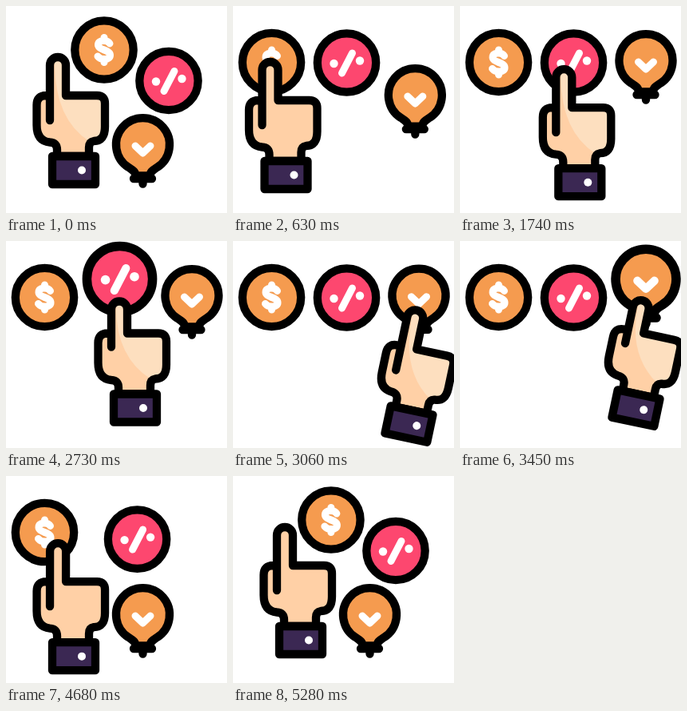
These frames come from a looping animation (277 by 259 pixels, 5.4 s). An HTML page:

```html
<!DOCTYPE html>
<html lang="en">
<head>
<meta charset="utf-8">
<title>Tapping hand</title>
<style>
  html, body { margin: 0; width: 100%; height: 100%; overflow: hidden; background: #fff; }
  svg { display: block; width: 100%; height: 100%; }
  .ink { stroke: #000; stroke-width: 10.3; stroke-linecap: round; stroke-linejoin: round; }
  .mark { fill: none; stroke: #fff; stroke-width: 9; stroke-linecap: round; stroke-linejoin: round; }
</style>
</head>
<body>
<svg viewBox="0 0 277 259">
  <g id="coin">
    <circle class="ink" r="36.7" fill="#f59b4f"/>
    <path class="mark" d="M7-8C4-13-8-13-7.5-6C-7 0 7 0 7.5 6C8 13-4 13-8 8M0-15.5V-12M0 12V15.5"/>
  </g>
  <g id="percent">
    <circle class="ink" r="36.7" fill="#fd476f"/>
    <path class="mark" d="M7-12L-6 13"/>
    <circle cx="-16" cy="1" r="5.2" fill="#fff"/>
    <circle cx="16.5" cy="-2.5" r="5.2" fill="#fff"/>
  </g>
  <g id="balloon">
    <path class="ink" fill="none" d="M-11.5 42.5H11.500M0 43V49"/>
    <path class="ink" fill="#f59b4f" d="M-9 39C-9 33-14 31-18 28.300A33.500 33.500 0 1 1 18 28.300C14 31 9 33 9 39Z"/>
    <path class="mark" d="M-9.500 1.500L0 10.500L9.500 1.500"/>
  </g>
  <g id="hand">
    <path id="skin" fill="#ffd0a6"/>
    <path id="shine" fill="#fddfbf"/>
    <path id="edge" class="ink" fill="none"/>
    <rect class="ink" x="58" y="188" width="54" height="35" fill="#3b2853"/>
    <circle cx="95" cy="205.500" r="5" fill="#fff"/>
  </g>
</svg>
<script>
const LOOP = 5400;
const el = id => document.getElementById(id);
const coin = el('coin'), percent = el('percent'), balloon = el('balloon');
const hand = el('hand'), skin = el('skin'), shine = el('shine'), edge = el('edge');

const mix = (a, b, u) => a + (b - a) * u;
const curve = (a, b, c, u) => mix(mix(a, b, u), mix(b, c, u), u);

// Smooth step from 0 at time a to 1 at time b.
function ease(t, a, b) {
  const u = Math.min(1, Math.max(0, (t - a) / (b - a)));
  return u * u * (3 - 2 * u);
}

// Rises during a..b, falls during c..d.
const hold = (t, a, b, c, d) => ease(t, a, b) - ease(t, c, d);
const bump = (t, a, peak, b) => hold(t, a, peak, peak, b);

function place(node, x, y, scale) {
  node.setAttribute('transform', `translate(${x} ${y}) scale(${scale})`);
}

// The finger gets shorter as it presses.
function drawHand(press) {
  const tip = 74 + 8 * press;
  const d = `M55 ${143 - 14 * press}V${tip}a10 10 0 0 1 20 0V112H114q10 0 10 10V151`
    + 'q0 18-14 18q-6 1-6 8V188H64V180q0-9-9-9.500Q38.500 169 38.500 149V124q0-12 12-12H55';
  skin.setAttribute('d', d);
  edge.setAttribute('d', d);
  shine.setAttribute('d', `M61 ${tip}a7 10 0 0 1 14 0V112H114q10 0 10 10V151`
    + `q0 18-14 18H104Q62 142 61 ${tip}Z`);
}

function draw(t) {
  // Cluster to row and back.
  const coinRow = hold(t, 180, 500, 4850, 5290);
  const percentRow = hold(t, 270, 610, 4430, 5050);
  const balloonRow = hold(t, 420, 760, 3930, 4430);

  // Each badge is pushed up and enlarged in turn.
  const coinLift = hold(t, 690, 1050, 1530, 1720);
  const percentLift = hold(t, 1830, 2280, 2730, 2940);
  const balloonLift = hold(t, 3030, 3450, 3930, 4330);

  place(coin, mix(123, 48.5, coinRow), mix(55, 70.5, coinRow) - 15.5 * coinLift,
    1 + .12 * coinLift);
  place(percent, mix(204, 142.5, percentRow), mix(93.5, 71, percentRow) - 23.5 * percentLift,
    1 + .12 * percentLift);
  place(balloon, curve(171.5, 237, 233, balloonRow),
    curve(173.5, 142, 68.5, balloonRow) - 20.5 * balloonLift, 1 + .13 * balloonLift);

  // The hand visits three stops, dipping on the way to each next one.
  const x = -18.5 * ease(t, 180, 600) + 95.5 * ease(t, 1530, 1800)
    + 58.5 * ease(t, 2730, 3040) - 135.5 * ease(t, 3930, 4410);
  const y = 6 * ease(t, 180, 600) - 2.5 * ease(t, 1530, 1800) - 3.5 * ease(t, 3930, 5150)
    + 13 * bump(t, 1530, 1800, 2280) + 21 * bump(t, 2730, 3000, 3450)
    + 24 * bump(t, 3930, 4485, 5150);
  const turn = 12 * hold(t, 2730, 3040, 4170, 4700);

  drawHand(coinLift + percentLift + balloonLift);
  shine.setAttribute('opacity', t < 180 || (t >= 1530 && t < 4500) ? 1 : 0);
  hand.setAttribute('transform', `translate(${x} ${y}) rotate(${turn} 84.5 205.5)`);
}

const start = performance.now();
function tick() {
  draw((performance.now() - start) % LOOP);
  requestAnimationFrame(tick);
}
tick();
</script>
</body>
</html>
```
